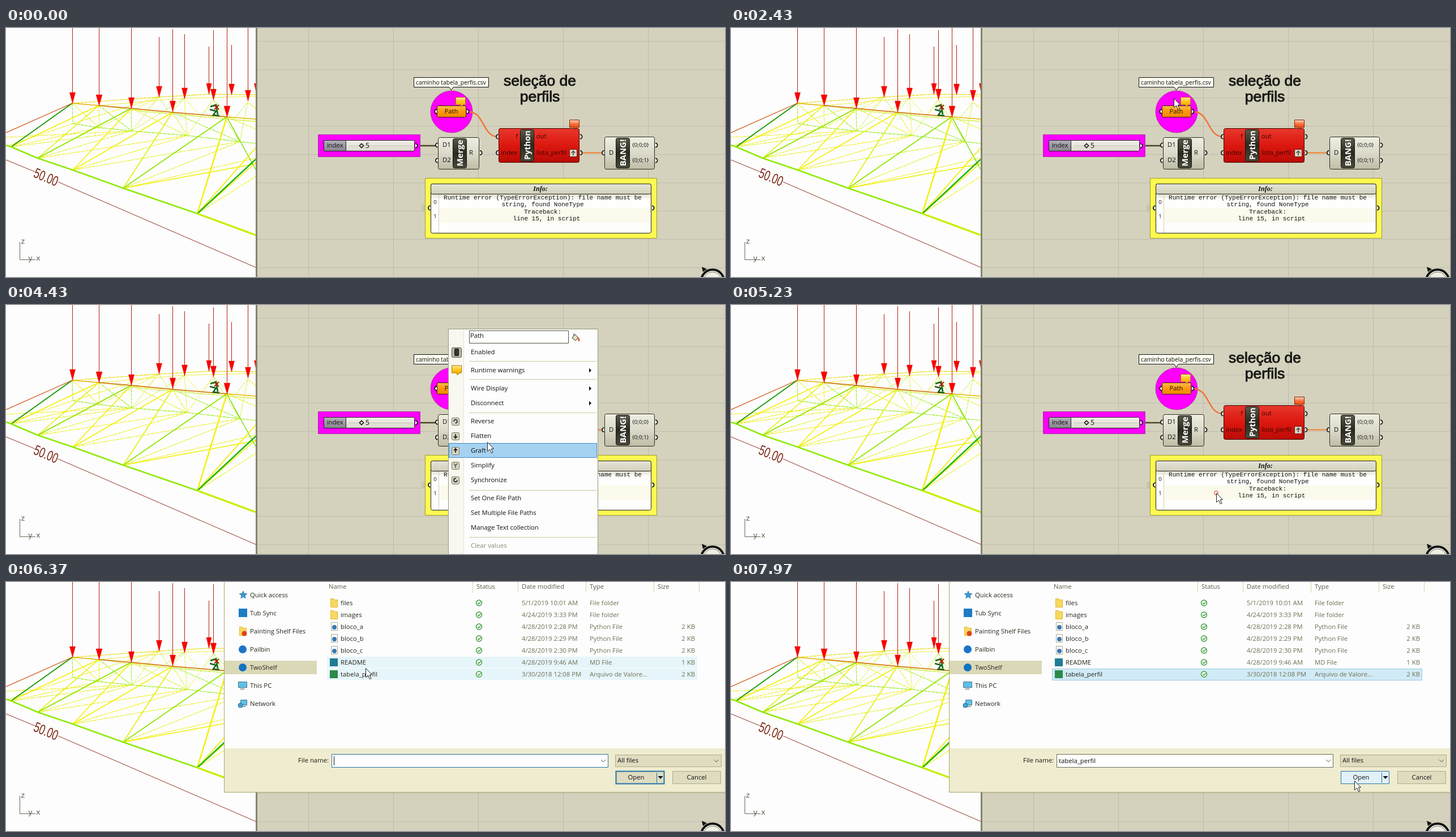
An HTML page with a canvas for the animation above (8000 ms loop, 1270 by 440 pixels).

```html
<!DOCTYPE html>
<html lang="pt">
<head>
<meta charset="utf-8">
<title>Seleção de perfis</title>
<style>
html, body { margin: 0; width: 100%; height: 100%; overflow: hidden; background: #fdfdfd; }
canvas { display: block; }
</style>
</head>
<body>
<canvas id="stage" width="1270" height="440"></canvas>
<script>
const ctx = document.getElementById('stage').getContext('2d');
const LOOP = 8000;
const SANS = '"Open Sans", "Noto Sans", sans-serif';
const UI = '11.3px ' + SANS;
const PAPER = '#fdfdfd', CANVAS = '#d4d2bd', DIALOG = '#efecd0', BUTTON = '#dfdcc0', INK = '#111';

// ---- helpers ----
function line(points, color, width = 1) {
  ctx.beginPath();
  for (let i = 0; i < points.length; i += 2) ctx.lineTo(points[i], points[i + 1]);
  ctx.strokeStyle = color;
  ctx.lineWidth = width;
  ctx.stroke();
}
function poly(points, fill, stroke, width = 1) {
  ctx.beginPath();
  for (let i = 0; i < points.length; i += 2) ctx.lineTo(points[i], points[i + 1]);
  ctx.closePath();
  paint(fill, stroke, width);
}
function paint(fill, stroke, width = 1) {
  if (fill) { ctx.fillStyle = fill; ctx.fill(); }
  if (stroke) { ctx.strokeStyle = stroke; ctx.lineWidth = width; ctx.stroke(); }
}
function box(x, y, w, h, fill, stroke, radius = 0, width = 1) {
  ctx.beginPath();
  ctx.roundRect(x + .5, y + .5, w, h, radius);
  paint(fill, stroke, width);
}
function area(x, y, w, h, fill) {
  ctx.fillStyle = fill;
  ctx.fillRect(x, y, w, h);
}
function disc(x, y, r, fill, stroke, width) {
  ctx.beginPath();
  ctx.arc(x, y, r, 0, 7);
  paint(fill, stroke, width);
}
// y is the middle of the line of text
function text(s, x, y, color = INK, font = UI, align = 'left', drop = 4) {
  ctx.font = font;
  ctx.textAlign = align;
  ctx.fillStyle = color;
  ctx.fillText(s, x, y + drop);
}
function shade(y, h, ...colors) {
  const g = ctx.createLinearGradient(0, y, 0, y + h);
  colors.forEach((c, i) => g.addColorStop(i / (colors.length - 1), c));
  return g;
}
function chevron(x, y) {
  line([x - 4, y - 2, x, y + 2, x + 4, y - 2], '#555540');
}

// ---- model view ----
const topFront = [[117, 133], [164, 137], [221, 142], [294, 149], [390, 157], [520, 169]];
const lowFront = [[9, 210], [56, 230], [118, 251], [207, 283], [338, 328], [540, 402]];
const topBack = [[270, 122], [315, 124], [366, 127], [427, 131], [510, 137]];
const lowMid = [[118, 169], [165, 176], [222, 182], [320, 190], [413, 201], [520, 212]];
const lowBack = [[245, 148], [290, 152], [345, 157], [402, 162], [480, 169]];

function chain(nodes, color, width) { line(nodes.flat(), color, width); }
// joins each upper node to lower nodes at the given index offsets
function web(upper, lower, offsets, colors, width = 1) {
  upper.forEach((a, i) => offsets.forEach((d, k) => {
    const b = lower[i + d];
    if (b) line([...a, ...b], colors[(i + k) % colors.length], width);
  }));
}

function drawLoad(x, top, tip, half) {
  line([x + .5, top, x + .5, tip], '#b4200f');
  poly([x - half + .5, tip - 19, x + half + .5, tip - 19, x + .5, tip], '#fa0000', '#d81000', .5);
}

function drawModel() {
  ctx.save();
  ctx.beginPath();
  ctx.rect(0, 0, 442, 440);
  ctx.clip();
  area(0, 0, 442, 440, PAPER);

  // far bars
  ctx.setLineDash([6, 1]);
  web(topBack, lowBack, [0, 1], ['#f0f040', '#c4f040']);
  web(topBack, lowMid, [1, 2], ['#f0f030', '#d4f030']);
  web(topFront, lowBack, [-1, -2], ['#f4f040', '#d0f040']);
  web(topFront, lowMid, [0, 1], ['#a0ee20', '#e8f020'], 1.1);
  chain(lowMid, '#98ec18', 1.2);
  chain(lowBack, '#c8f030');
  line([0, 193, 222, 182], '#eef020', 1.1);
  line([0, 209, 118, 169, 270, 122], '#f0f028', 1.1);
  web(lowFront, lowMid, [1, 2], ['#eef010', '#e4f020'], 1.1);
  line([117, 133, 270, 122, 358, 117, 441, 118], '#e6dc00', 1.2);
  line([164, 137, 315, 124, 441, 121], '#f2ec20');
  ctx.setLineDash([]);

  // near bars
  web(topFront, lowFront, [0, -1], ['#f2f000', '#e2f000'], 1.5);
  line([207, 283, 441, 240], '#f0f000', 1.5);
  line([117, 133, 9, 210], '#169a10', 1.8);
  line([221, 142, 56, 230], '#8ae410', 1.5);
  line([390, 157, 207, 283], '#90e810', 1.6);
  line([390, 157, 338, 328], '#f4f000', 2.4);
  line([390, 157, 441, 250], '#7ae010', 1.5);
  line([441, 212, 338, 328], '#eef000', 1.8);
  line([441, 232, 338, 328], '#20b410', 2.4);
  chain([[0, 207], ...lowFront], '#90ea08', 2.6);
  line([338, 328, 441, 366], '#c8f000', 3.4);

  line([0, 185, 117, 133], '#d05010', 1.2);
  line([117, 133, 164, 137], '#e8b000', 1.3);
  line([164, 137, 221, 142, 294, 149, 390, 157], '#d06a00', 1.6);
  line([390, 157, 441, 161], '#e8b800', 1.5);

  [[117, -5, 133, 5], [164, -5, 137, 5.5], [221, -5, 142, 5], [270, 16, 122, 5],
   [294, 2, 148, 5], [315, 11, 125, 5], [358, 33, 117, 4.5], [366, 4, 127, 5],
   [390, -5, 157, 5.5], [398, 30, 118, 5], [427, -5, 129, 5], [442, 99, 117, 4]]
    .forEach(a => drawLoad(...a));

  line([361, 139, 371, 136, 374, 153], '#167a18', 3);
  line([360, 144, 371, 147, 366, 154, 377, 155], '#126018', 2.5);
  line([368, 136, 376, 144], '#b02008', 2);
  line([376, 136, 368, 144], '#b02008', 2);

  line([0, 233, 51, 254], '#8e3426');
  line([92, 272, 441, 423], '#8e3426');
  ctx.save();
  ctx.translate(71, 263);
  ctx.transform(.74, .31, -.42, 1.05, 0, 0);
  text('50.00', 0, 0, '#7c2412', '22px "Liberation Sans", Arial, sans-serif', 'center', 8);
  ctx.restore();

  line([24.5, 378, 24.5, 409.5, 52, 409.5], '#68685a');
  const mono = '13px "Liberation Mono", monospace';
  text('z', 26, 377, '#55554a', mono);
  text('y', 39, 407, '#55554a', mono);
  text('x', 53, 407, '#55554a', mono);
  ctx.restore();
  area(441, 0, 3, 440, '#85846f');
}

// ---- node editor ----
function port(x, y, from, to) {
  ctx.beginPath();
  ctx.arc(x, y, 3.6, from, to);
  paint('#fff', INK, 1.8);
}
const portLeft = (x, y) => port(x, y, Math.PI / 2, Math.PI * 1.5);
const portRight = (x, y) => port(x, y, -Math.PI / 2, Math.PI / 2);

function bubble(x, y, tint, edge) {
  poly([x, y, x + 17, y, x + 17, y + 13, x + 13, y + 13, x + 10, y + 17, x + 8, y + 13, x, y + 13],
    shade(y, 14, ...tint), edge);
}
const AMBER = ['#ffe8a0', '#ffc820', '#f4ac00'], EMBER = ['#ffd8c0', '#f87038', '#ec4410'];

function label(s, x, y, w, h, size) {
  box(x, y, w, h, shade(y, h, '#5a594a', '#2a2a20', '#48473a'), '#17170f', 3);
  ctx.save();
  ctx.translate(x + w / 2 + .5, y + h / 2);
  ctx.rotate(-Math.PI / 2);
  text(s, 0, 0, '#fff', `bold ${size}px ${SANS}`, 'center', 5);
  ctx.restore();
}
function shell(x, y, w, h) {
  box(x, y, w, h, shade(y, h, '#efeee2', '#dcdaca', '#bfbda6'), '#2a2a1c', 3);
}

function drawEditor() {
  area(444, 0, 826, 440, CANVAS);
  for (let x = 534; x < 1270; x += 150) area(x, 0, 1, 440, '#bbb9ac');
  for (let y = 23; y < 440; y += 50) area(444, y, 826, 1, '#bfbdae');

  const title = '26.5px "Liberation Sans", Arial, sans-serif';
  ['seleção de', 'perfils'].forEach((s, i) => {
    const y = 101.5 + i * 28;
    text(s, 943, y, '#181816', title, 'center', 0);
    ctx.strokeStyle = '#181816';
    ctx.lineWidth = .9;
    ctx.strokeText(s, 943, y);
  });

  disc(787, 148, 37, '#ff00ff', '#b030a0', 1);
  poly([720.5, 87.5, 852.5, 87.5, 852.5, 104.5, 790, 104.5, 786.5, 110, 783, 104.5, 720.5, 104.5], '#fcfbf0', INK);
  text('caminho tabela_perfis.csv', 724, 96, INK, '10.3px ' + SANS, 'left', 3.5);

  ctx.beginPath();
  ctx.moveTo(818, 148);
  ctx.bezierCurveTo(845, 150, 842, 190, 867, 192);
  paint(null, '#f4703a', 2.4);
  line([1018, 220.5, 1053, 220.5], '#f4802c', 2.2);
  line([727, 208, 760, 208], '#4a4424', 2.4);

  portLeft(761, 147.5);
  portRight(814, 147.5);
  box(761, 137, 51, 20, shade(137, 20, '#ffc050', '#ff9a10', '#f08800'), '#402400', 2);
  text('Path', 786.5, 147, '#1c1000', UI, 'center');
  bubble(794.5, 122.5, AMBER, '#a87800');

  box(551, 188, 180, 39, '#ff00ff', '#a8309c');
  portRight(723, 208);
  box(561, 198, 160, 19, shade(198, 20, '#f2f1ea', '#dad8cb'), '#222', 2);
  box(561, 198, 39, 19, shade(198, 20, '#b4b2bc', '#85838c'), '#222', 2);
  text('index', 581, 207, '#111', UI, 'center');
  line([606, 208.5, 718, 208.5], '#c6c4b4');
  poly([628, 204.5, 631.5, 208, 628, 211.5, 624.5, 208], '#fff', INK, 1.6);
  text('5', 635, 208, INK, '12px ' + SANS);

  portLeft(762.5, 207); portLeft(762.5, 234);
  portRight(837, 220.5);
  shell(763, 193, 72, 56);
  label('Merge', 789, 195, 24, 52, 15);
  text('D1', 771, 206);
  text('D2', 771, 233);
  text('R', 818, 220);

  portLeft(869.5, 192); portLeft(869.5, 220.5);
  portRight(1014, 192); portRight(1014, 220.5);
  box(870, 177, 142, 60, shade(177, 60, '#e8382c', '#dc1810', '#bc0a06'), '#400400', 3);
  label('Python', 908, 179, 24, 56, 14.5);
  const dark = '#3c0500';
  text('f', 904, 191, dark, UI, 'right');
  text('index', 903, 220, dark, UI, 'right');
  text('out', 937, 191, dark);
  text('lista_perfil', 937, 220, dark, '11px ' + SANS);
  box(995, 214, 13, 13, '#dcd4c4', '#5a2010', 2);
  line([1002, 225, 1002, 217.5], '#555', 1.8);
  line([998.5, 221, 1002, 217, 1005.5, 221], '#555', 1.4);
  bubble(995.5, 162.5, EMBER, '#802000');

  portLeft(1056.5, 220.5);
  portRight(1147, 207); portRight(1147, 234);
  shell(1057, 192, 88, 57);
  label('BANG!', 1077, 194, 24, 53, 15);
  text('D', 1065, 220);
  text('{0;0;0}', 1106, 206, INK, '9.8px ' + SANS);
  text('{0;0;1}', 1106, 233, INK, '9.8px ' + SANS);

  drawPanel();
  drawCompass();
}

function drawPanel() {
  box(740, 265, 409, 106, '#fffa50', '#a09a28');
  [742, 745].forEach(x => {
    ctx.beginPath();
    ctx.arc(x, 318, 7, 2.2, 4.1);
    paint(null, '#b5b3a0', 1.2);
  });
  portLeft(749.5, 318); portRight(1141, 318);
  box(750, 275, 389, 87, '#fefefc', '#222', 3);
  box(750, 275, 389, 18, shade(275, 18, '#e6e4d6', '#d2d0bc'), '#222', 3);
  area(751, 294, 388, 8, shade(294, 8, '#e2e0d2', '#fcfbf4'));
  area(766, 319, 373, 25, '#fbfaec');
  line([764.5, 294, 764.5, 362], '#d2cfba');
  text('Info:', 944, 284, INK, 'italic bold 12px "Liberation Serif", "Times New Roman", serif', 'center');
  const mono = '11px "Liberation Mono", "Courier New", monospace';
  ['Runtime error (TypeErrorException): file name must be', 'string, found NoneType', 'Traceback:', 'line 15, in script']
    .forEach((s, i) => text(s, i === 3 ? 955 : 948, 299.5 + i * 12.3, INK, mono, 'center', 3.5));
  text('0', 758, 307, INK, '9.5px ' + SANS, 'center');
  text('1', 758, 332, INK, '9.5px ' + SANS, 'center');
}

function drawCompass() {
  disc(1248, 447, 20, '#f0efe4', INK, 4);
  disc(1248, 447, 16, null, '#77756a', 1);
  poly([1229, 422, 1238, 426, 1231, 431], INK);
}

// ---- context menu ----
const menuRows = [['Enabled', 83], ['Runtime warnings', 115], ['Wire Display', 147], ['Disconnect', 173],
  ['Reverse', 205], ['Flatten', 231], ['Graft', 257], ['Simplify', 283], ['Synchronize', 309],
  ['Set One File Path', 341], ['Set Multiple File Paths', 367], ['Manage Text collection', 393], ['Clear values', 425]];

function drawMenuIcon(name, y) {
  const x = 794;
  if (name === 'Enabled') {
    box(x - 7, y - 8, 17, 17, '#b9b6a4', '#55533f', 2);
    box(x - 2, y - 6, 7, 12, '#333', '#111', 1);
  } else if (name === 'Runtime warnings') {
    bubble(x - 6.5, y - 8, AMBER, '#a87800');
  } else if (y >= 205 && y <= 309) {
    box(x - 7, y - 6, 13, 13, '#d9d6c4', '#77745a', 2);
    const shapes = {
      Flatten: () => line([x - 3, y + 1, x, y + 4, x + 3, y + 1, x, y + 4, x, y - 3], '#222', 1.8),
      Graft: () => line([x - 3, y, x, y - 3, x + 3, y, x, y - 3, x, y + 4], '#222', 1.8),
      Simplify: () => { line([x - 3, y - 3, x, y + 1, x + 3, y - 3], '#555', 1.6); line([x, y, x, y + 5], '#555', 1.6); }
    };
    if (shapes[name]) shapes[name]();
    else {
      const from = name === 'Reverse' ? 3 : 0;
      ctx.beginPath();
      ctx.arc(x, y + .5, 3, from, from + 5);
      paint(null, '#333', 1.8);
    }
  }
}

function drawMenu(hoverY) {
  box(781, 42, 264, 410, PAPER, '#98967c');
  area(783, 44, 26, 396, '#f8f7f0');
  line([808.5, 44, 808.5, 440], '#e5e3d4');
  box(818, 45, 175, 22, '#fefefe', '#55543f');
  text('Path', 820, 54);
  poly([1000, 58, 1005, 52, 1011, 58, 1006, 63], '#e5e0c0', '#333');
  line([1002, 54, 1004, 50], '#333');
  line([1009, 58, 1012, 60, 1012, 64], '#d84a10', 2.2);
  [99, 131, 190, 327, 410].forEach(y => area(818, y, 225, 1, '#cbc89c'));

  for (const [name, y] of menuRows) {
    if (hoverY >= y - 13 && hoverY < y + 13) box(782, y - 13, 261, 25, '#a6d2f2', '#3a8cc4');
    drawMenuIcon(name, y);
    text(name, 821, y, name === 'Clear values' ? '#8b8a70' : INK);
    if ([115, 147, 173].includes(y)) poly([1030, y - 3.5, 1034, y + .5, 1030, y + 4.5], INK);
  }
}

// ---- file dialog ----
const places = ['Quick access', 'Tub Sync', 'Painting Shelf Files', 'Pailbin', 'TwoShelf', 'This PC', 'Network'];
const files = [
  ['files', '5/1/2019 10:01 AM', 'File folder', ''],
  ['images', '4/24/2019 3:33 PM', 'File folder', ''],
  ['bloco_a', '4/28/2019 2:28 PM', 'Python File', '2 KB'],
  ['bloco_b', '4/28/2019 2:29 PM', 'Python File', '2 KB'],
  ['bloco_c', '4/28/2019 2:30 PM', 'Python File', '2 KB'],
  ['README', '4/28/2019 9:46 AM', 'MD File', '1 KB'],
  ['tabela_perfil', '3/30/2018 12:08 PM', 'Arquivo de Valore...', '2 KB']
];

function folder(x, y) {
  poly([x, y, x + 5, y, x + 6, y + 2, x + 12, y + 2, x + 12, y + 15, x, y + 15], '#f7d860', '#e0b838');
}
function monitor(x, y, w, h) {
  box(x, y, w, h, '#5cc0ea', '#4d7488');
  line([x + w / 2 - 4, y + h + 3, x + w / 2 + 4, y + h + 3], '#6c8088', 1.5);
}
function star(x, y) {
  const points = [];
  for (let i = 0; i < 10; i++) {
    const r = i % 2 ? 3 : 7, a = i * Math.PI / 5 - Math.PI / 2;
    points.push(x + r * Math.cos(a), y + r * Math.sin(a));
  }
  poly(points, '#3a9ad8', '#2878b0');
}
const placeIcons = [
  y => star(419, y),
  y => area(411, y - 8, 15, 15, '#1d7cc4'),
  y => { folder(412.5, y - 7.5); disc(421, y + 4, 4.5, '#e0401c'); },
  y => disc(418, y, 7, '#1c74c8'),
  y => disc(418, y, 7, '#1474c0'),
  y => monitor(410, y - 7, 15, 10),
  y => { monitor(414, y - 7, 11, 9); disc(414, y + 3, 4, '#4aa0d0', '#2a7098'); }
];

function fileIcon(i, y) {
  if (i < 2) return folder(573.5, y - 7.5);
  if (i < 5) {
    box(574, y - 8, 11, 14, '#fefefe', '#aaa98e');
    return disc(580, y + 1, 4, '#3a78b0');
  }
  area(572, y - 7, 14, 14, i === 5 ? '#207c94' : '#2c8a48');
}

function button(s, x, center, fill, stroke, width) {
  box(x, 334, 85, 22, fill, stroke, 0, width);
  text(s, center, 345, INK, UI, 'center');
}

function drawDialog(p, picked) {
  area(385, 0, 885, 372, '#a8a566');
  area(386, 0, 884, 371, PAPER);
  area(386, 294, 884, 77, DIALOG);

  area(386, 139, 163, 24, '#dbd8b8');
  places.forEach((s, i) => {
    const y = 22.5 + i * 32.1;
    placeIcons[i](Math.round(y));
    text(s, 431, y, '#26261c');
  });

  const olive = '#706f55';
  [['Name', 570], ['Status', 831], ['Date modified', 911], ['Type', 1031], ['Size', 1151]]
    .forEach(([s, x]) => text(s, x, 8, '#5c5c48'));
  [824, 904, 1024, 1144, 1224].forEach(x => area(x, 0, 1, 19, '#d6d3a8'));

  files.forEach(([name, date, type, size], i) => {
    const y = 37 + i * 21;
    const hover = p[0] > 567 && p[0] < 1221 && p[1] > y - 11 && p[1] <= y + 10.5;
    if (picked && i === 6) box(567, y - 10, 653, 20, '#d0eaf6', '#9ccbe0');
    else if (hover) area(567, y - 10, 654, 20, '#e6f5fa');
    fileIcon(i, y);
    text(name, 591, y, '#26261c');
    disc(835.5, y, 5, '#fdfdfd', '#389a38', 1.4);
    line([833, y, 835, y + 2, 838.5, y - 2], '#389a38', 1.3);
    text(date, 911, y, olive);
    text(type, 1031, y, olive);
    text(size, 1217, y, olive, UI, 'right');
  });

  text('File name:', 570, 315, '#1a1a10', UI, 'right');
  box(575, 304, 488, 23, '#fefefe', picked ? '#6e6d55' : '#2474a8');
  if (picked) text('tabela_perfil', 579, 316);
  else area(579, 308, 1, 16, INK);
  chevron(1055, 316);
  box(1076, 305, 187, 21, BUTTON, '#b0ad8c');
  text('All files', 1080, 315);
  chevron(1255, 316);

  const overOpen = p[0] > 1077 && p[0] < 1162 && p[1] > 334 && p[1] < 357;
  button('Open', 1077, 1113, overOpen ? '#e2f1f8' : BUTTON, '#2274a8', overOpen ? 1 : 2);
  line([1149.5, 337, 1149.5, 355], '#2274a8');
  poly([1151.5, 343, 1160.5, 343, 1156, 348], INK);
  button('Cancel', 1177, 1220, BUTTON, '#b0ad8c', 1);
}

// ---- pointer: time, x, y ----
const path = [
  [900, 836, 106], [1600, 792, 110], [2430, 782, 124], [2560, 782, 128], [3150, 781, 150], [4190, 781, 150],
  [4430, 850, 242], [4820, 860, 336], [5000, 857, 332], [5870, 857, 332],
  [6370, 635, 152], [6620, 620, 160], [7080, 620, 160], [7500, 925, 303], [7780, 1101, 351], [8000, 1101, 351]
];
function pointerAt(t) {
  let i = 1;
  while (i < path.length - 1 && t > path[i][0]) i++;
  const [t0, x0, y0] = path[i - 1], [t1, x1, y1] = path[i];
  const k = Math.min(1, Math.max(0, (t - t0) / (t1 - t0)));
  return [x0 + (x1 - x0) * k, y0 + (y1 - y0) * k];
}
function drawPointer([x, y]) {
  ctx.save();
  ctx.translate(Math.round(x) + .5, Math.round(y) + .5);
  poly([0, 0, 0, 16, 4, 12.5, 7, 19, 9.5, 18, 6.7, 11.5, 11, 11.5], '#fff', '#222');
  ctx.restore();
}

const clicks = [[3600, '80,150,90'], [5150, '225,50,40'], [6800, '225,50,40']];
function drawClick(t, [x, y]) {
  for (const [start, rgb] of clicks) {
    const age = t - start;
    if (age <= 0 || age > 620) continue;
    disc(x, y, age * .04, null, `rgba(${rgb},${.75 * (1 - age / 620)})`, 1.5);
  }
}

function render(t) {
  const p = pointerAt(t);
  drawModel();
  drawEditor();
  if (t >= 3680 && t < 5170) drawMenu(t > 4200 ? p[1] + 4 : -1);
  if (t >= 5650) drawDialog(p, t >= 6850);
  drawClick(t, p);
  if (t >= 900) drawPointer(p);
}

function tick() {
  render(performance.now() % LOOP);
  requestAnimationFrame(tick);
}
tick();
</script>
</body>
</html>
```
